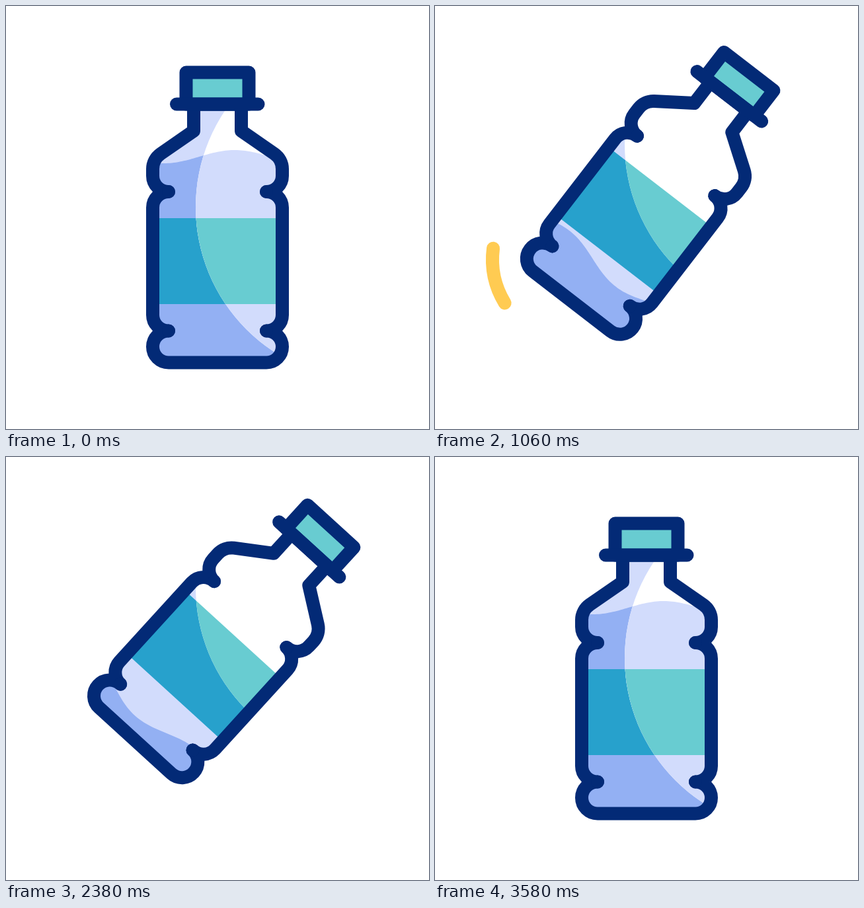
Write an HTML page with a canvas that moves like this. It is 640 px wide and 640 px high and loops after 3.6 s.

```html
<!DOCTYPE html>
<html lang="en">
<head>
<meta charset="utf-8">
<title>Tilting bottle</title>
<style>
  html, body { margin: 0; width: 100%; height: 100%; overflow: hidden; background: #fff; }
  canvas { display: block; width: 100vw; height: 100vh; }
</style>
</head>
<body>
<canvas id="stage"></canvas>
<script>
const SIZE = 640, LOOP = 3600;
const NAVY = '#032a76', TEAL = '#68ccd1', YELLOW = '#ffcb52';
const SHADED = { air: '#d2dcfc', water: '#93b0f3', label: '#27a1cc' };
const LIT = { air: '#ffffff', water: '#d2dcfc', label: TEAL };

const canvas = document.getElementById('stage');
const ctx = canvas.getContext('2d');
const ratio = window.devicePixelRatio || 1;
canvas.width = canvas.height = SIZE * ratio;

const body = new Path2D(`M284 148.5V189L234 223.6A28 28 0 0 0 222 246.6V257
  A24 24 0 0 0 246 281A24 24 0 0 0 222 305V467.5
  A24 24 0 0 0 246 491.5A24 24 0 0 0 222 515.5A24 24 0 0 0 246 539.5H394
  A24 24 0 0 0 418 515.5A24 24 0 0 0 394 491.5A24 24 0 0 0 418 467.5V305
  A24 24 0 0 0 394 281A24 24 0 0 0 418 257V246.6
  A28 28 0 0 0 406 223.6L356 189V148.5Z`);
const cap = new Path2D('M272.5 100.5H367.5V148.5H272.5Z');
const brim = new Path2D('M258 148.5H381.5');
const notches = [[246, 281], [394, 281], [246, 491.5], [394, 491.5]];

const clamp = x => Math.min(1, Math.max(0, x));
const easeOut = x => 1 - (1 - clamp(x)) ** 1.5;

// Symmetric cubic-bezier(.85, 0, .15, 1)
function swing(x) {
  x = clamp(x);
  const a = 0.85;
  let lo = 0, hi = 1, s = x;
  for (let i = 0; i < 30; i++) {
    s = (lo + hi) / 2;
    const bx = 3 * a * (1 - s) ** 2 * s + 3 * (1 - a) * (1 - s) * s * s + s ** 3;
    if (bx < x) lo = s; else hi = s;
  }
  return s * s * (3 - 2 * s);
}

const tiltAt = t => t < 1860 ? swing(t / 1730) : 1 - swing((t - 2000) / 1600);

function pose(k) {
  ctx.translate(320 + 24.3 * k, 320 - 55.2 * k);
  ctx.rotate(44 * k * Math.PI / 180);
  ctx.translate(-320, -320);
}

function drawContents(k, colors) {
  ctx.save();
  pose(k);
  ctx.clip(body);
  ctx.fillStyle = colors.air;
  ctx.fillRect(200, 130, 240, 430);

  const level = 228 + 282 * k, height = 10 + 2.5 * k, trough = 239 - 610 * k;
  ctx.beginPath();
  ctx.moveTo(200, 560);
  for (let x = 200; x <= 440; x += 3) {
    ctx.lineTo(x, level + height * Math.cos((x - trough) / 214 * 2 * Math.PI));
  }
  ctx.lineTo(440, 560);
  ctx.fillStyle = colors.water;
  ctx.fill();

  ctx.fillStyle = colors.label;
  ctx.fillRect(200, 321, 240, 130);
  ctx.restore();
}

function drawOutline(k) {
  ctx.save();
  pose(k);
  ctx.strokeStyle = ctx.fillStyle = NAVY;
  ctx.stroke(body);
  for (const [x, y] of notches) {
    ctx.beginPath();
    ctx.arc(x, y, 10, 0, 2 * Math.PI);
    ctx.fill();
  }
  ctx.fillStyle = TEAL;
  ctx.fill(cap);
  ctx.stroke(cap);
  ctx.stroke(brim);
  ctx.restore();
}

const RIGHT = { x: 261, y: 283, r: 267.5 };
const LEFT = { x: 215, y: 383, r: 128 };
const streaks = [
  { arc: RIGHT, from: 2, to: 46.4, head: 520, tail: 590, span: 403 },
  { arc: LEFT, from: 148.4, to: 191.6, head: 900, tail: 1060, span: 205 },
  { arc: LEFT, from: 191.6, to: 148.4, head: 2540, tail: 2660, span: 205 },
  { arc: RIGHT, from: 46.4, to: 2, head: 2800, tail: 2980, span: 400 }
];

function drawStreak({ arc, from, to, head, tail, span }, t) {
  if (t <= head || t >= tail + span) return;
  const angle = start => (from + (to - from) * easeOut((t - start) / span)) * Math.PI / 180;
  ctx.beginPath();
  ctx.arc(arc.x, arc.y, arc.r, angle(tail), angle(head), to < from);
  ctx.strokeStyle = YELLOW;
  ctx.stroke();
}

function draw(t) {
  const k = tiltAt(t);
  ctx.setTransform(ratio, 0, 0, ratio, 0, 0);
  ctx.fillStyle = '#fff';
  ctx.fillRect(0, 0, SIZE, SIZE);
  ctx.lineWidth = 20;
  ctx.lineCap = ctx.lineJoin = 'round';

  drawContents(k, SHADED);
  ctx.save();
  ctx.beginPath();
  ctx.arc(549, 304 - 111 * k, 262, 0, 2 * Math.PI);
  ctx.clip();
  drawContents(k, LIT);
  ctx.restore();

  drawOutline(k);
  for (const streak of streaks) drawStreak(streak, t);
}

function tick() {
  draw(performance.now() % LOOP);
  requestAnimationFrame(tick);
}
tick();
</script>
</body>
</html>
```
